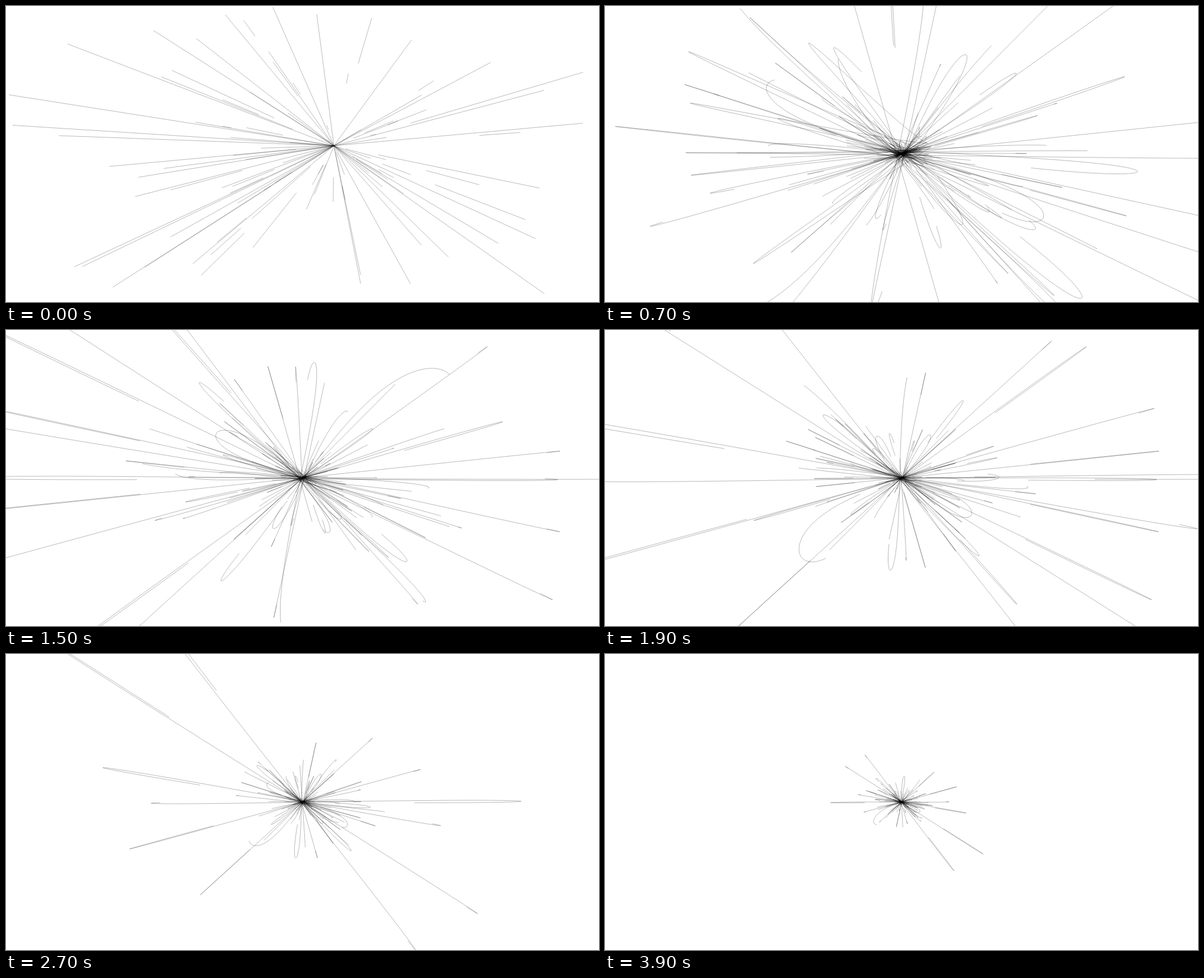
Recreate the animation shown at these times as an HTML page with a canvas. Size 1000 by 500 pixels, loop 4 s.

```html
<!DOCTYPE html>
<html lang="en">
<head>
<meta charset="utf-8">
<title>Swarm</title>
<style>
  html, body { margin: 0; width: 100%; height: 100%; overflow: hidden; background: #fff; }
  canvas { display: block; width: 1000px; height: 500px; }
</style>
</head>
<body>
<canvas id="stage" width="1000" height="500"></canvas>
<script>
const LOOP = 4000, STEP = 100, TAU = Math.PI * 2;
const ctx = document.getElementById('stage').getContext('2d');
const first = { x: 553, y: 236 }, rest = { x: 500, y: 250 };
const particles = [];

let seed = 7;
function rand() {
  seed = (seed * 16807) % 2147483647;
  return seed / 2147483647;
}
function between(a, b) {
  return a + (b - a) * rand();
}
function smooth(a, b, t) {
  const u = Math.min(1, Math.max(0, (t - a) / (b - a)));
  return u * u * (3 - 2 * u);
}
// The attractor slides from its first place to the middle.
function center(t) {
  const u = smooth(0, 400, t);
  return { x: first.x + (rest.x - first.x) * u, y: first.y + (rest.y - first.y) * u };
}

// Starts at (x, y) and drops inwards; left is the share of the way remaining at time 0.
function fall(x, y, left) {
  const dx = x - first.x, dy = y - first.y, angle = Math.acos(left), span = 260;
  particles.push({
    span, from: -span, until: 800,
    at(t) {
      const c = center(t), fade = t > 0 ? Math.exp(-((t / 350) ** 2)) : 1;
      const s = Math.cos(angle * (1 + t / span)) * fade;
      return [c.x + dx * s, c.y + dy * s];
    }
  });
}

// Swings through the attractor along (dx, dy), turning there at time peak.
// It passes a little beside the middle at first and closes in later.
function swing(dx, dy, { peak, period, span, bend, reach }) {
  const miss = between(-1, 1) * 16, lift = between(-4, 4);
  particles.push({
    span, from: 0, until: LOOP,
    at(t) {
      const c = center(t), a = TAU * (t - peak) / period, r = reach(t);
      const s = r * Math.cos(a), n = r * bend * Math.sin(2 * a);
      const off = Math.exp(-t / 1300);
      return [
        c.x + dx * s - dy * n + miss * off,
        c.y + dy * s + dx * n + (lift - miss * 0.4) * off
      ];
    }
  });
}

// A long swing with one turning point at (x, y) at the given time; its trail shows both ends.
function longSwing(time, [x, y], decay, presence) {
  const peak = time - 30;
  swing(x - rest.x, y - rest.y, {
    peak, period: 800, span: 570, bend: between(-0.006, 0.006),
    reach: t => Math.exp((peak - t) / decay) * presence(t)
  });
}

const starts = [
  [5, 150], [180, 475], [370, 15], [450, 2], [524, 14], [684, 57], [973, 198], [908, 486],
  [893, 393], [746, 424], [682, 469], [598, 469], [129, 440], [89, 219], [321, 55], [174, 271]
];
for (const [x, y] of starts) fall(x, y, 0);

for (let i = 0; i < 78; i++) {
  const pull = 1 - 0.85 * rand() ** 1.5;
  const x = first.x + (between(5, 985) - first.x) * pull;
  const y = first.y + (between(5, 480) - first.y) * pull;
  fall(x, y, rand() < 0.55 ? 0 : between(0.2, 0.95));
}

const early = [[-50, -16], [-60, 129], [-60, 248], [-60, 308], [100, 538], [250, -30], [830, 156]];
for (const end of early) {
  longSwing(1100, end, 1500, t => smooth(100, 600, t) * (1 - smooth(1500, 2100, t)));
}

const late = [[370, 81], [343, 223], [299, 122], [420, 323], [365, 287], [672, 249]];
for (const end of late) longSwing(3100, end, 1050, t => smooth(1150, 1400, t));

for (let i = 0; i < 72; i++) {
  const a = TAU * rand(), r = 30 + 540 * rand() ** 1.9;
  swing(r * Math.cos(a), 0.6 * r * Math.sin(a), {
    peak: between(0, 1000), period: between(650, 1000), span: between(220, 480),
    bend: between(-0.22, 0.22) * rand() ** 4,
    reach: t => smooth(0, 500, t) * Math.exp((700 - t) / 1500)
  });
}

function trail(p, t) {
  const start = Math.max(p.from, t - p.span), parts = 60;
  if (t <= start || t > p.until) return;
  ctx.beginPath();
  for (let i = 0; i <= parts; i++) {
    const [x, y] = p.at(start + (t - start) * i / parts);
    ctx.lineTo(x, y);
  }
  ctx.stroke();
}

function draw(t) {
  ctx.fillStyle = '#fff';
  ctx.fillRect(0, 0, 1000, 500);
  ctx.strokeStyle = 'rgba(0,0,0,0.27)';
  ctx.lineWidth = 1;
  ctx.lineJoin = 'round';
  for (const p of particles) trail(p, t);
}

const begin = performance.now();
let shown = -1;
function tick() {
  const t = Math.max(0, performance.now() - begin) % LOOP;
  const now = Math.floor(t / STEP) * STEP;
  if (now !== shown) draw(shown = now);
  requestAnimationFrame(tick);
}
tick();
</script>
</body>
</html>
```
